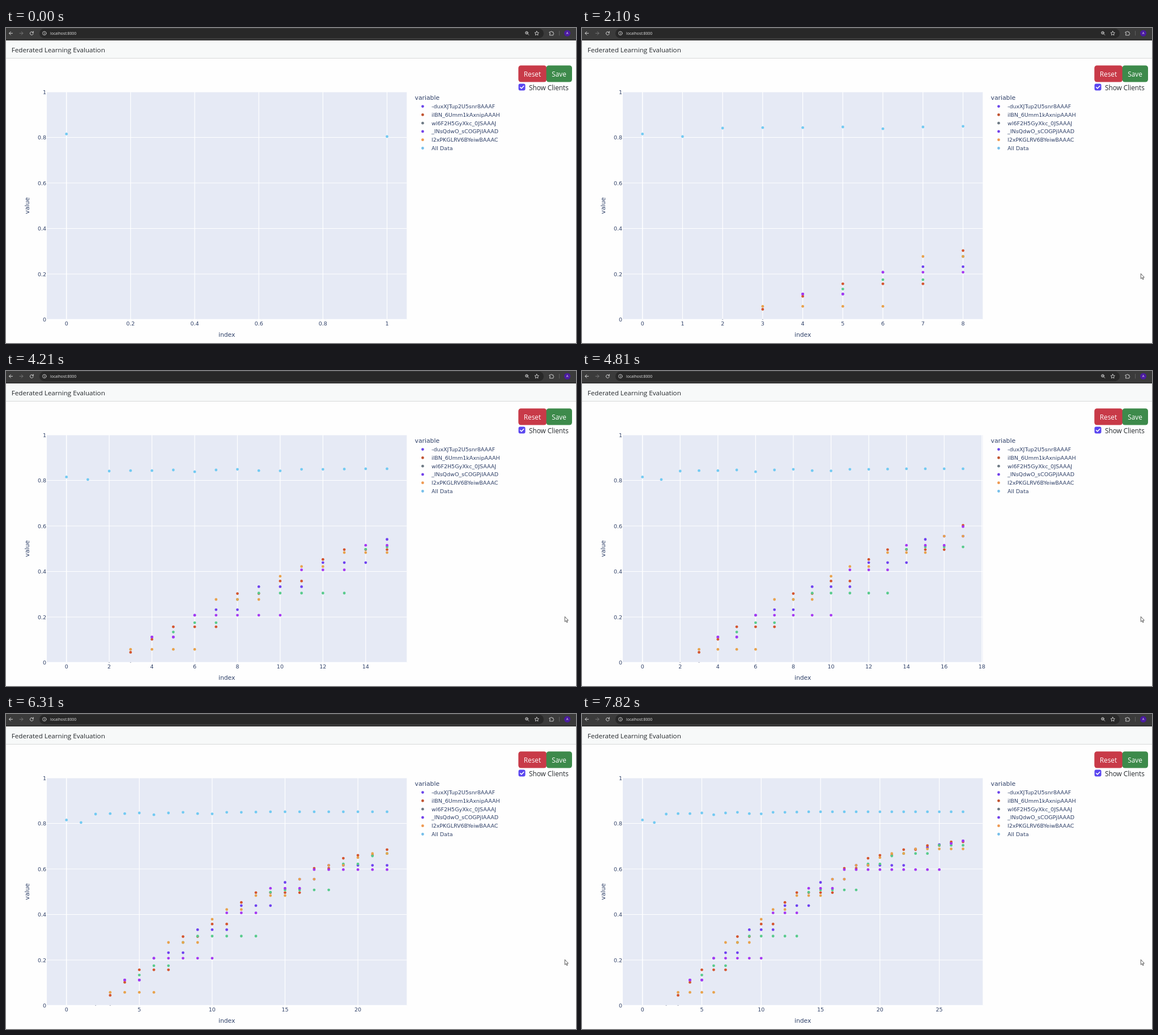
Recreate the animation shown at these times as an HTML page. Size 1006 px wide and 557 px high, loop 8 s.

```html
<!DOCTYPE html>
<html lang="en">
<head>
<meta charset="utf-8">
<title>Federated Learning Evaluation</title>
<style>
html, body { margin: 0; width: 100%; height: 100%; overflow: hidden; background: #fefefe; }
svg { display: block; }
.ui { font-family: "Open Sans", "Noto Sans", sans-serif; fill: #24282c; }
.chart { font-family: "DejaVu Sans", sans-serif; font-size: 9.5px; fill: #2f4068; }
.mid { text-anchor: middle; }
.end { text-anchor: end; }
.axis { font-size: 10.8px; }
.icon { fill: none; stroke: #d8d8d8; stroke-width: 1; stroke-linecap: round; stroke-linejoin: round; }
</style>
</head>
<body>
<svg width="1006" height="557" viewBox="0 0 1006 557">
  <!-- browser bar -->
  <rect width="1006" height="22" fill="#3b3b3b"/>
  <rect y="20.5" width="1006" height="1.5" fill="#2e2e2e"/>
  <rect x="59" y="1" width="890" height="17" rx="8.5" fill="#282828"/>
  <g class="icon">
    <path d="M11.5 9.3H5.7M8.3 6.5 5.5 9.3l2.8 2.8"/>
    <path d="M24 9.3h5.8M27.2 6.5 30 9.3l-2.8 2.8" stroke="#777"/>
    <path d="M47.6 7.6A2.9 2.9 0 1 0 48.2 10M48.3 6v2.2h-2.2"/>
    <circle cx="67.8" cy="9.3" r="3.3" stroke-width=".8"/>
    <path d="M67.8 9v2M67.8 7.4v.1" stroke-width=".9"/>
    <circle cx="919" cy="8.5" r="2.3"/>
    <path d="M920.8 10.4 922.8 12.4M918 8.5h2" stroke-width=".9"/>
    <path d="M936.7 5.6l1.1 2.4 2.6.3-1.9 1.8.5 2.6-2.3-1.3-2.3 1.3.5-2.6-1.9-1.8 2.6-.3z" stroke-width=".9"/>
    <path d="M959.5 7h2a1.1 1.1 0 0 1 2.2 0h2v2a1.1 1.1 0 0 1 0 2.2v1.6h-6.2v-1.7a1.1 1.1 0 0 0 0-2.2z" stroke-width=".9"/>
    <path d="M976.5 5.5v7.5" stroke="#666" stroke-width=".8"/>
  </g>
  <circle cx="990.6" cy="9.3" r="5.6" fill="#4a1ba0"/>
  <text class="ui mid" x="990.6" y="11.4" font-size="5.8" style="fill:#fff">A</text>
  <text class="ui" x="78" y="11.6" font-size="6.85" style="fill:#e6e6e6">localhost:8000</text>

  <!-- page header and controls -->
  <rect y="22" width="1006" height="31.5" fill="#f7f9f9"/>
  <rect y="53" width="1006" height="1" fill="#d7d8d9"/>
  <text class="ui" x="9.8" y="43" font-size="11.65">Federated Learning Evaluation</text>
  <rect x="904.3" y="66.3" width="49.8" height="29.3" rx="4.5" fill="#c83a48"/>
  <rect x="953.6" y="66.3" width="45.4" height="29.3" rx="4.5" fill="#3d8a4b"/>
  <text class="ui mid" x="929" y="86" font-size="11.8" style="fill:#fff">Reset</text>
  <text class="ui mid" x="976" y="86" font-size="11.8" style="fill:#fff">Save</text>
  <rect x="904.5" y="98.6" width="12" height="12" rx="3" fill="#5a46f0"/>
  <path d="M907.6 104.8l2.1 2.1 4-4.2" fill="none" stroke="#fff" stroke-width="1.6" stroke-linecap="round" stroke-linejoin="round"/>
  <text class="ui" x="923" y="109.6" font-size="11.8">Show Clients</text>

  <!-- chart -->
  <rect x="72" y="113" width="635.3" height="402.5" fill="#e6eaf5"/>
  <g id="grid" stroke="#fff"></g>
  <g id="dots"></g>
  <g id="labels" class="chart"></g>
  <text class="chart axis mid" x="389.7" y="546.3">index</text>
  <text class="chart axis mid" transform="translate(41.2 314) rotate(-90)">value</text>
  <g id="legend" class="chart"><text class="axis" x="721.5" y="127">variable</text></g>

  <path id="cursor" d="M0 0V9L2 7.2 3.5 10.4 4.8 9.8 3.4 6.7H6.1Z" fill="#fff" stroke="#333" stroke-width=".8" stroke-linejoin="round"/>
</svg>
<script>
const LOOP = 8000, LAST = 27;
const LEFT = 72, RIGHT = 707.3, TOP = 113, BOTTOM = 515.5, X0 = 106.7, SPAN = 565.8;
const $ = id => document.getElementById(id);

// Each series holds a value until its next [index, value] step.
const series = [
  { name: '-duxXJTup2U5snr8AAAF', key: '#6a45ea', color: '#6f42f0',
    steps: [[4, .112], [6, .208], [7, .232], [9, .333], [12, .439], [15, .541], [16, .555],
            [18, .616], [23, .687], [24, .695], [25, .707], [26, .713], [27, .723]] },
  { name: 'ilBN_6Umm1kAxnipAAAH', key: '#c0522f', color: '#d4552f',
    steps: [[3, .045], [4, .102], [5, .157], [8, .303], [10, .358], [12, .453], [13, .496],
            [17, .603], [19, .647], [20, .66], [22, .685], [24, .703], [26, .719]] },
  { name: 'wl6F2H5GyXkc_0JSAAAJ', key: '#6e7a84', color: '#58cb8c',
    steps: [[5, .134], [6, .175], [8, .277], [9, .305], [14, .498], [15, .508],
            [19, .622], [21, .657], [22, .668], [25, .704]] },
  { name: '_INsQdwO_sCOGPjIAAAD', key: '#7240ea', color: '#a638f2',
    steps: [[4, .112], [6, .208], [11, .407], [14, .515], [17, .597], [26, .712], [27, .723]] },
  { name: 'l2xPKGLRV6BYeiwBAAAC', key: '#ee9850', color: '#e8a34e',
    steps: [[3, .058], [7, .277], [10, .379], [11, .422], [13, .483], [16, .555],
            [18, .616], [20, .65], [21, .668], [23, .688]] },
  { name: 'All Data', key: '#76bfea', color: '#72caf2',
    steps: [[0, .815], [1, .804], [2, .841], [3, .843], [5, .846], [6, .838], [7, .846],
            [8, .849], [9, .843], [10, .842], [11, .849], [13, .85], [14, .851]] }
];

function add(parent, tag, attrs, text) {
  const el = document.createElementNS('http://www.w3.org/2000/svg', tag);
  for (const k in attrs) el.setAttribute(k, attrs[k]);
  if (text !== undefined) el.textContent = text;
  parent.appendChild(el);
  return el;
}

const yOf = v => BOTTOM - v * (BOTTOM - TOP);
const xOf = (i, n) => X0 + SPAN * i / n;
const label = v => String(+v.toFixed(1));

for (let i = 0; i <= 5; i++) {
  const y = yOf(i / 5);
  add($('grid'), 'path', { d: `M${LEFT} ${y}H${RIGHT}`, 'stroke-width': i ? 1.2 : 1.6 });
  add($('labels'), 'text', { class: 'end', x: 71, y: y + 3.5 }, label(i / 5));
}
const xGrid = add($('grid'), 'g', {});
const xLabels = add($('labels'), 'g', { class: 'mid' });

const dots = [];
for (const i of [2, 3]) {
  const el = add($('dots'), 'rect', { width: 2, height: .8, y: 514.9, fill: '#8b93a8' });
  dots.push({ el, i, attr: 'x', shift: -1 });
}
series.forEach((s, row) => {
  const y = 138.6 + row * 14.78;
  add($('legend'), 'circle', { cx: 735.4, cy: y, r: 2.4, fill: s.key });
  add($('legend'), 'text', { x: 751, y: y + 3.5 }, s.name);
  s.steps.forEach(([from, v], k) => {
    const to = k + 1 < s.steps.length ? s.steps[k + 1][0] : LAST + 1;
    for (let i = from; i < to; i++) {
      const el = add($('dots'), 'circle', { cy: yOf(v), r: 2.4, fill: s.color });
      dots.push({ el, i, attr: 'cx', shift: 0 });
    }
  });
});

// Round the tick spacing up to 1, 2 or 5 times a power of ten.
function tickStep(n) {
  const rough = (RIGHT - LEFT) / SPAN * n / 10;
  const base = 10 ** Math.floor(Math.log10(rough));
  return base * [1, 2, 5, 10].find(m => rough <= m * base);
}

let shown = 0;
function drawChart(n) {
  if (n === shown) return;
  shown = n;
  xGrid.replaceChildren();
  xLabels.replaceChildren();
  const step = tickStep(n);
  for (let k = 0; xOf(k * step, n) < RIGHT; k++) {
    const x = xOf(k * step, n);
    add(xGrid, 'path', { d: `M${x} ${TOP}V${BOTTOM}`, 'stroke-width': k ? 1.2 : 1.6 });
    add(xLabels, 'text', { x, y: 526 }, label(k * step));
  }
  for (const d of dots) {
    d.el.style.display = d.i <= n ? '' : 'none';
    d.el.setAttribute(d.attr, xOf(d.i, n) + d.shift);
  }
}

// Pointer enters from the lower right: [time, x, y]
const pointer = [[400, 989, 538], [500, 988, 492], [700, 987, 452], [800, 986.3, 434.3]];

const stepTime = k => k * 300 + 10 * Math.floor(k / 11);

function draw(t) {
  let k = 0;
  while (k < LAST - 1 && stepTime(k + 1) <= t) k++;
  drawChart(k + 1);
  const pos = pointer.filter(p => p[0] <= t).pop();
  $('cursor').style.display = pos ? '' : 'none';
  if (pos) $('cursor').setAttribute('transform', `translate(${pos[1]} ${pos[2]})`);
}

const start = performance.now();
function tick() {
  draw((performance.now() - start) % LOOP);
  requestAnimationFrame(tick);
}
tick();
</script>
</body>
</html>
```
